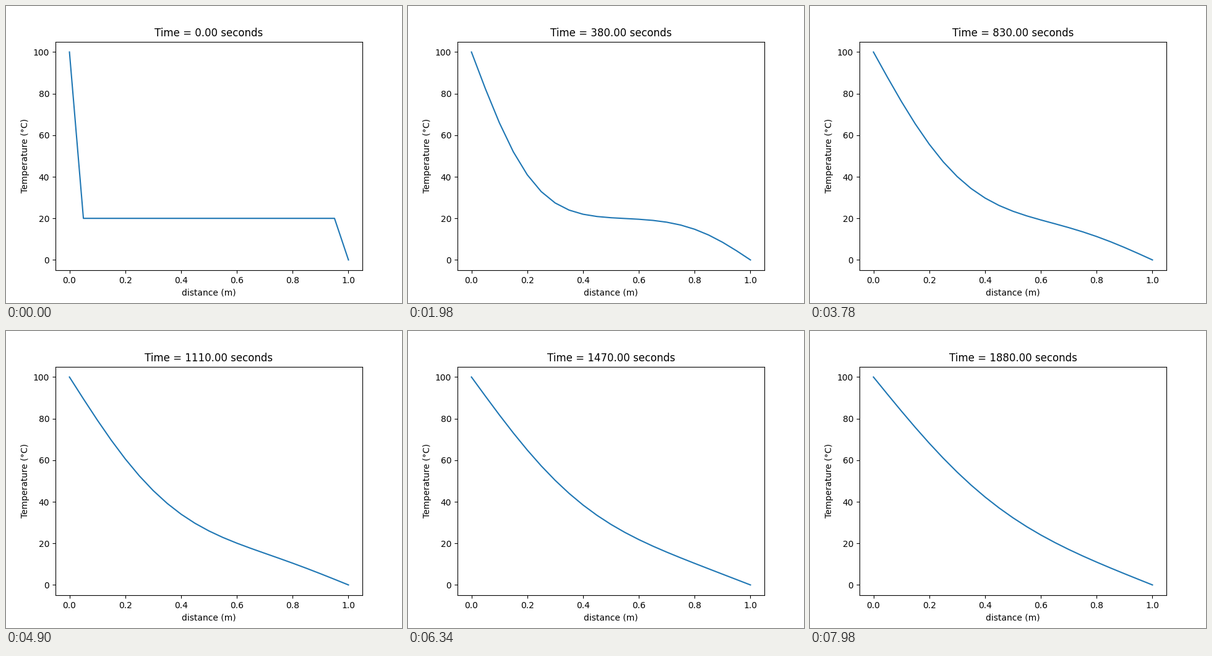
Recreate the animation shown at these times as a matplotlib script. Size 640 by 480 pixels, loop 8 s.

```python
import numpy as np
import matplotlib.pyplot as plt
from matplotlib.animation import FuncAnimation

LENGTH = 1.0        # m
CELLS = 20
ALPHA = 4.13e-5     # thermal diffusivity, m^2/s
DT = 10.0           # s per step
STEPS = 188

TICK_MS = 20
LOOP_MS = 8000
HOLD_MS = 500
STEP_MS = 40


def solve():
    """Explicit heat conduction in a rod with fixed end temperatures."""
    fourier = ALPHA * DT / (LENGTH / CELLS) ** 2
    temp = np.full(CELLS + 1, 20.0)
    temp[0], temp[-1] = 100.0, 0.0
    history = [temp.copy()]
    for _ in range(STEPS):
        temp[1:-1] += fourier * np.diff(temp, 2)
        history.append(temp.copy())
    return history


history = solve()
x = np.linspace(0, LENGTH, CELLS + 1)

fig, ax = plt.subplots(figsize=(6.4, 4.8), dpi=100)
line, = ax.plot(x, history[0], color="#1f77b4", lw=1.5)
ax.set_xlim(-0.05, 1.05)
ax.set_ylim(-5, 105)
ax.set_xlabel("distance (m)")
ax.set_ylabel("Temperature (°C)")
title = ax.set_title("Time = 0.00 seconds")


def update(frame):
    ms = frame * TICK_MS
    step = 0 if ms < HOLD_MS else (ms - HOLD_MS) // STEP_MS + 1
    line.set_ydata(history[step])
    title.set_text(f"Time = {step * DT:.2f} seconds")
    return line, title


anim = FuncAnimation(fig, update, frames=LOOP_MS // TICK_MS,
                     interval=TICK_MS, repeat=True, repeat_delay=0,
                     init_func=lambda: update(0), blit=False)
plt.show()
```
